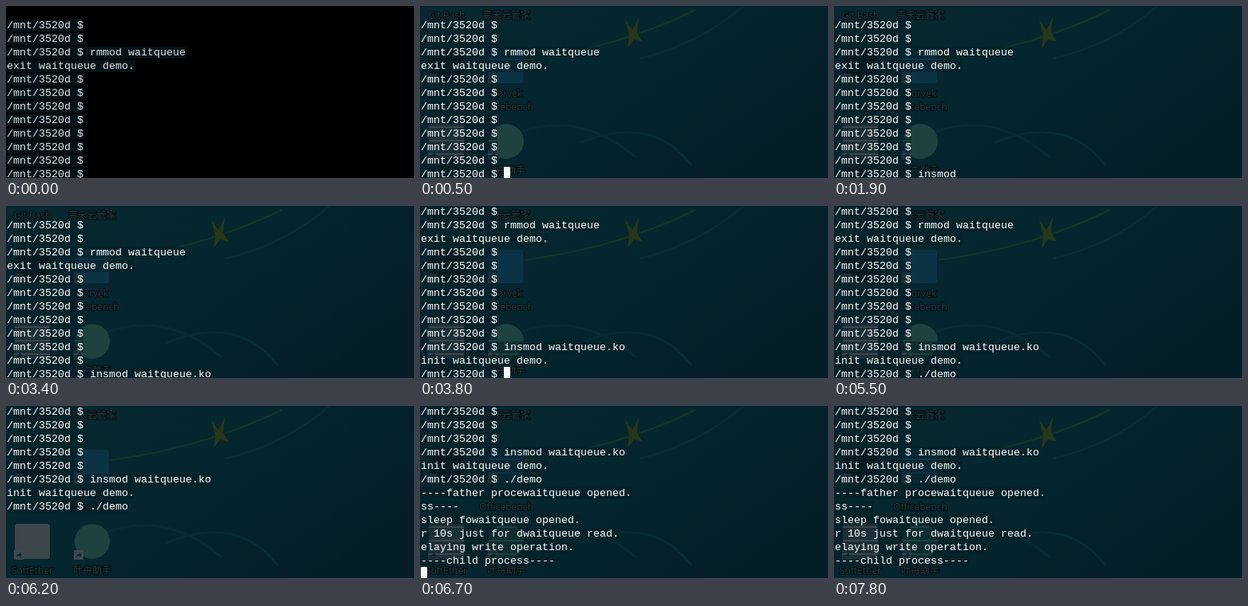
Write an HTML page that moves like this. It is 511 px wide and 216 px high and loops after 8 s.

```html
<!DOCTYPE html>
<html lang="en">
<head>
<meta charset="utf-8">
<style>
html, body { margin: 0; width: 100%; height: 100%; overflow: hidden; background: #000; }
#stage { position: relative; width: 511px; height: 216px; overflow: hidden; }
#desktop { position: absolute; left: 0; top: 0; }
#desktop text {
  font: 12px "Open Sans", "Noto Sans CJK SC", "Noto Sans CJK", sans-serif;
  text-anchor: middle; fill: #2a3436; stroke: #041318; stroke-width: 2px; paint-order: stroke;
}
#screen {
  position: absolute; left: 1px; top: -1px; white-space: pre; color: #fff;
  font: 13.333px/17px "Liberation Mono", "Courier New", monospace;
}
#screen div { height: 17px; }
#screen span { background: rgba(5, 32, 40, .6); }
#cursor { position: absolute; top: 202px; width: 8px; height: 14px; background: #f2f5f5; }
</style>
</head>
<body>
<div id="stage">
  <svg id="desktop" width="511" height="216" viewBox="0 0 511 216">
    <defs>
      <linearGradient id="sky" x1="0" y1="0" x2="1" y2=".6">
        <stop offset="0" stop-color="#06282e"/>
        <stop offset=".5" stop-color="#05262f"/>
        <stop offset="1" stop-color="#041e28"/>
      </linearGradient>
      <g id="shortcut">
        <rect width="12" height="12" fill="#3d484c"/>
        <path d="M3 9 Q3 5 7 5 V3 L10 6 L7 9 V7 Q4 7 3 9Z" fill="#0b2338"/>
      </g>
    </defs>
    <rect width="511" height="216" fill="url(#sky)"/>
    <g fill="none">
      <path d="M130 68 Q250 52 345 5" stroke="#123327" stroke-width="2"/>
      <path d="M275 66 Q350 48 405 0" stroke="#092c35" stroke-width="2"/>
      <path d="M110 165 Q195 125 270 190 M200 172 Q290 135 340 200" stroke="#072a33" stroke-width="3"/>
    </g>
    <path d="M257 17 L266 30 L274 14 L272 34 L279 45 L268 42 L260 53 L262 37Z" fill="#263718"/>
    <rect x="12" y="53" width="42" height="42" fill="#07161b"/>
    <rect x="86" y="55" width="43" height="42" rx="3" fill="#0c3345"/>
    <rect x="11" y="148" width="44" height="44" rx="3" fill="#3c464b"/>
    <circle cx="108" cy="170" r="22" fill="#1d423f"/>
    <use href="#shortcut" x="10" y="85"/>
    <use href="#shortcut" x="85" y="85"/>
    <use href="#shortcut" x="10" y="181"/>
    <use href="#shortcut" x="85" y="181"/>
    <text x="33" y="16">Git Bash</text>
    <text x="108" y="16">青禾云管家</text>
    <text x="33" y="113">Console</text>
    <text x="108" y="114">Norvek</text>
    <text x="108" y="131">Officebench</text>
    <text x="33" y="211">SoftEther</text>
    <text x="108" y="211">叶舟助手</text>
  </svg>
  <div id="screen"></div>
  <div id="cursor"></div>
</div>
<script>
const LOOP = 8000, ROWS = 13, CELL = 8;
const PROMPT = "/mnt/3520d $ ";
const byId = id => document.getElementById(id);
const desktop = byId("desktop"), cursor = byId("cursor");

const rows = Array.from({ length: ROWS }, () => {
  const span = document.createElement("span");
  const row = document.createElement("div");
  row.append(span);
  byId("screen").append(row);
  return span;
});

const start = ["", PROMPT, PROMPT, PROMPT + "rmmod waitqueue", "exit waitqueue demo.",
  ...Array(7).fill(PROMPT)];
const entered = [...start, PROMPT + "insmod waitqueue.ko"];
const loaded = [...entered, "init waitqueue demo."];
const launched = [...loaded, PROMPT + "./demo"];
const finished = [...launched,
  "----father procewaitqueue opened.", "ss----", "sleep fowaitqueue opened.",
  "r 10s just for dwaitqueue read.", "elaying write operation.", "----child process----"];

// Each step: time, lines above, last line, cursor visible
const steps = [];
const add = (log, prefix, entries) => entries.forEach(([time, typed, on]) =>
  steps.push({ time, log, last: prefix + typed, on }));

add(start, PROMPT, [
  [0, "", false], [500, "", true], [1200, "i", true], [1300, "in", true],
  [1500, "insm", true], [1600, "insmd", true], [1700, "insm", true],
  [1900, "insmod ", false], [2300, "insmod ", true], [2700, "insmod w", true],
  [2900, "insmod wa", true], [3100, "insmod waitqueue.ko ", true],
  [3400, "insmod waitqueue.ko ", false]
]);
add(entered, "", [[3700, "", true]]);
add(loaded, PROMPT, [
  [3800, "", true], [4200, "", false], [4300, ".", true], [4400, "./", true],
  [4500, "./d", true], [4600, "./de", true], [4800, "./de", false],
  [5000, "./dem", true], [5100, "./demo ", true], [5500, "./demo ", false],
  [5900, "./demo ", true]
]);
add([...launched, "", "", "", ""], "", [[6200, "", false]]);
add(finished, "", [
  [6300, "", false], [6700, "", true], [7000, "", false], [7400, "", true], [7800, "", false]
]);

let shown;
function draw(now) {
  const time = now % LOOP;
  const step = steps.findLast(s => s.time <= time);
  if (step !== shown) {
    shown = step;
    const lines = [...step.log, step.last].slice(-ROWS);
    rows.forEach((span, i) => { span.textContent = lines[i].trimEnd(); });
    cursor.style.left = 1 + CELL * step.last.length + "px";
    cursor.style.visibility = step.on ? "visible" : "hidden";
    desktop.style.visibility = time < 500 ? "hidden" : "visible";
    byId("screen").style.color = time < 500 ? "#e6e6e6" : "#fff";
  }
}
const origin = performance.now();
function tick() {
  draw(performance.now() - origin);
  requestAnimationFrame(tick);
}
tick();
</script>
</body>
</html>
```
